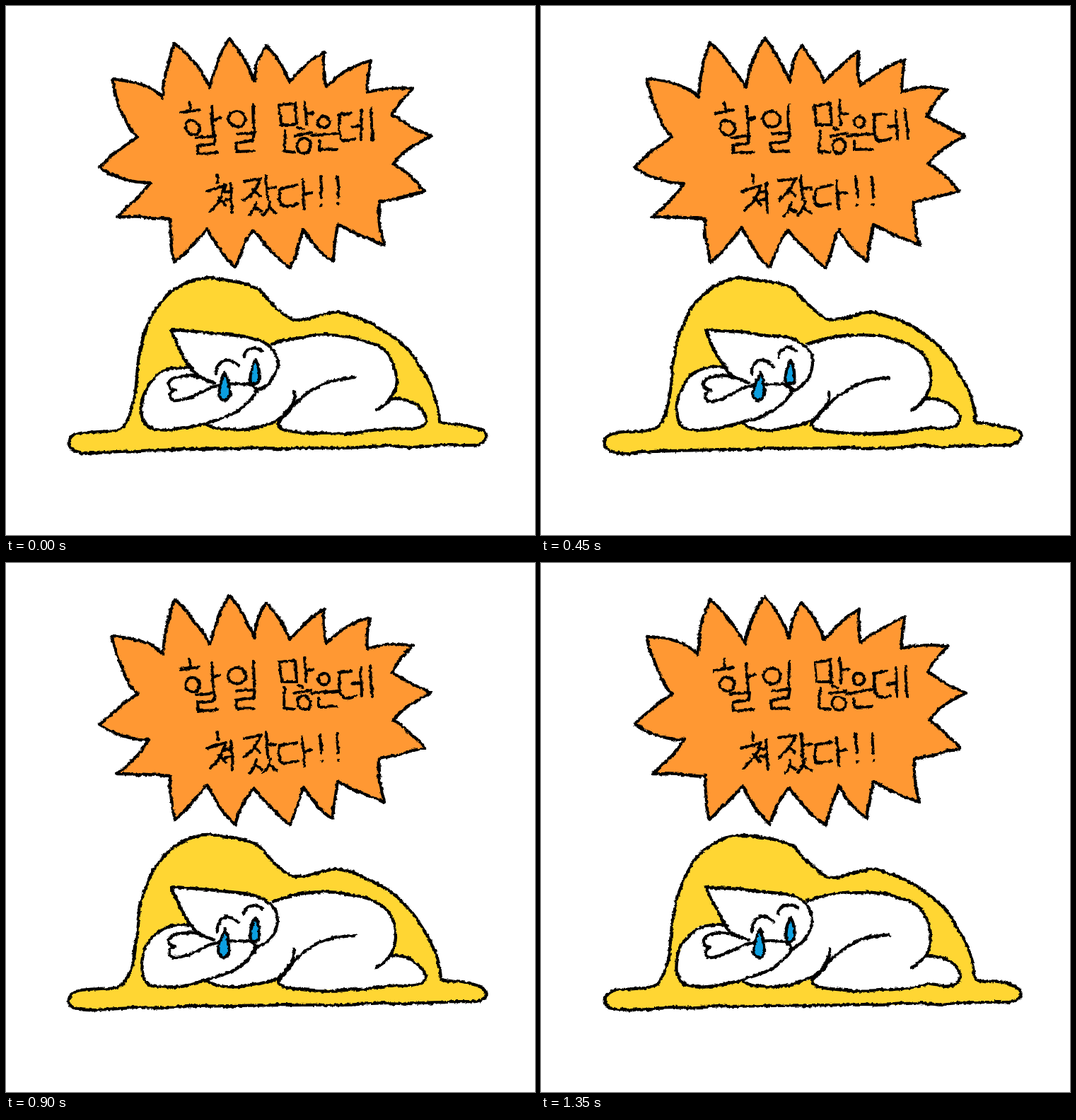
Animation of 748x748 px, one loop 1.5 s. Source, as an HTML page:

```html
<!DOCTYPE html>
<html lang="ko">
<head>
<meta charset="utf-8">
<title>할 일 많은데 쳐잤다!!</title>
<style>
  html, body { margin: 0; width: 100%; height: 100%; overflow: hidden; background: #fff; }
  svg { display: block; width: 100%; height: 100%; }
  .fills { filter: url(#drift); fill: #fff; }
  .lines { filter: url(#crayon); fill: none; stroke: #000; stroke-width: 4.3; stroke-linecap: round; stroke-linejoin: round; }
  .orange { fill: #ff9833; }
  .yellow { fill: #ffd633; }
  .tears { fill: #0c9fe0; }
  .letters { stroke-width: 4; }
</style>
</head>
<body>
<svg viewBox="0 0 748 748" role="img" aria-label="할 일 많은데 쳐잤다!!">
  <defs>
    <filter id="drift" filterUnits="userSpaceOnUse" x="0" y="0" width="748" height="748" color-interpolation-filters="sRGB">
      <feTurbulence class="noise" type="fractalNoise" baseFrequency=".03" numOctaves="2"/>
      <feDisplacementMap in="SourceGraphic" scale="3" xChannelSelector="R" yChannelSelector="G"/>
    </filter>
    <filter id="crayon" filterUnits="userSpaceOnUse" x="0" y="0" width="748" height="748" color-interpolation-filters="sRGB">
      <feTurbulence class="noise" type="fractalNoise" baseFrequency=".03" numOctaves="2" result="slow"/>
      <feDisplacementMap in="SourceGraphic" in2="slow" scale="4.5" xChannelSelector="R" yChannelSelector="G" result="bent"/>
      <feTurbulence class="noise" type="fractalNoise" baseFrequency=".22" numOctaves="2" result="grain"/>
      <feDisplacementMap in="bent" in2="grain" scale="4" xChannelSelector="G" yChannelSelector="R"/>
    </filter>

    <path id="burst" d="M149,104 Q200,106 222,129 Q224,85 239,52 Q262,70 289,115 Q296,75 316,46 Q340,74 351,106
      Q354,75 368,56 Q388,76 401,108 Q424,80 450,65 Q446,88 453,113 Q480,88 515,77 Q509,100 511,121
      Q545,112 575,117 Q556,135 546,155 Q575,172 601,184 Q565,200 548,222 Q575,240 592,262 Q560,270 528,277
      Q526,305 535,338 Q500,325 469,309 Q465,335 461,361 Q438,345 420,316 Q412,345 402,371 Q372,345 350,318
      Q332,340 324,370 Q303,350 284,314 Q264,340 239,363 Q232,335 232,301 Q190,298 157,298 Q185,275 203,250
      Q165,250 132,228 Q158,203 186,185 Q162,160 149,104Z"/>
    <path id="puddle" d="M90,621 C88,612 96,606 106,604 C128,601 150,604 166,595 C180,575 183,550 185,525
      C187,490 193,462 210,432 C228,402 255,385 285,385 C312,387 338,391 356,399 C370,412 378,428 404,443
      C428,448 445,432 470,433 C500,437 530,455 556,474 C585,503 612,545 614,588 C630,594 655,590 674,601
      C684,611 676,618 664,621 C630,622 600,619 567,624 C530,619 500,626 470,625 C400,624 330,626 260,627
      C210,629 170,628 130,632 C110,633 92,631 90,621Z"/>
    <path id="arm" d="M264,513 C228,504 207,522 197,545 C188,570 189,592 207,598 C230,603 265,596 290,587 C320,580 345,565 356,543"/>
    <path id="head" d="M294,533 C275,526 266,522 261,512 C250,495 241,478 233,458 C270,460 310,464 345,468 C370,474 384,488 384,506 C382,528 368,541 352,545"/>
  </defs>

  <g class="fills">
    <use href="#burst" class="orange"/>
    <use href="#puddle" class="yellow"/>
    <path d="M374,478 C410,466 460,458 510,474 C540,482 552,505 552,530 C550,545 546,552 543,556
      C565,552 588,565 593,583 C594,598 575,600 550,596 C510,604 450,608 400,601 C390,599 380,596 388,583
      C365,600 300,604 284,590 L300,520Z"/>
    <use href="#arm"/>
    <use href="#head"/>
  </g>

  <g class="lines">
    <use href="#burst"/>
    <use href="#puddle"/>
    <path d="M376,478 C410,466 460,458 510,474 C540,482 552,505 552,530 C550,550 540,564 524,571"/>
    <path d="M386,587 C380,595 390,599 400,601 C450,608 510,604 550,596 C575,600 594,598 593,583 C588,565 565,552 543,556"/>
    <path d="M493,526 C455,526 425,544 407,563 Q398,578 386,588 M407,546 C409,560 402,568 390,582 C365,600 300,606 284,590"/>
    <use href="#arm"/>
    <use href="#head"/>
    <path d="M294,533 C272,521 236,519 230,533 C229,540 234,543 239,543 C229,547 229,558 240,558 C258,558 268,546 290,539 C315,533 345,531 354,542"/>
    <path d="M298,521 C296,502 314,493 329,509 M336,496 C338,483 352,480 362,488"/>
    <g class="tears">
      <path d="M310,518 C304,530 300,540 300,550 C302,560 314,560 316,550 C317,538 314,528 310,518Z"/>
      <path d="M353,501 C347,512 344,525 346,532 C349,537 356,536 358,530 C359,518 357,508 353,501Z"/>
    </g>
    <g class="letters">
      <path d="M259,136 L261,146 M246,152 L273,148 M263,162 a10,10 0 1 0 1,0 M291,142 L293,180 M292,162 L303,158 M268,186 L295,183 L294,194 L271,197 L272,208 L299,207"/>
      <path d="M326,149 a12,11 0 1 0 1,0 M350,140 L351,174 M327,181 L352,178 L350,190 L325,194 L326,206 L351,205"/>
      <path d="M387,140 L389,168 M388,140 L409,138 L411,168 L389,168 M422,134 L424,168 M423,152 L434,151 M394,177 L393,205 L409,207 M413,173 L420,175 M408,184 L432,180 M421,188 a9,10 0 1 0 1,0"/>
      <path d="M449,156 a8,8 0 1 0 1,0 M433,184 L469,180 M443,191 L443,204 L468,203"/>
      <path d="M470,155 L488,153 M472,155 Q469,180 475,188 Q482,193 494,187 M490,171 L502,169 M502,148 L503,188 M516,146 L518,189"/>
      <path d="M299,239 L300,250 M284,262 L311,254 Q304,276 288,290 M301,271 L310,281 M309,263 L319,262 M309,274 L319,273 M318,251 L320,292"/>
      <path d="M336,248 L361,244 Q352,264 336,274 M350,259 L359,268 M368,240 L370,274 M370,258 L382,257 M353,278 Q351,290 344,297 M352,286 L361,291 M373,277 Q370,290 363,296 M371,285 L382,293"/>
      <path d="M411,253 L388,258 Q385,274 389,282 Q400,285 411,280 M419,247 L421,287 M421,266 L432,264"/>
      <path d="M445,242 L447,270 M447,281 h.5 M468,242 L470,270 M470,280 h.5"/>
    </g>
  </g>
</svg>
<script>
  const STEP = 150, POSES = 10;
  const noises = document.querySelectorAll('.noise');
  let shown = -1;

  // Each pose redraws the same lines with a fresh hand tremble.
  function draw() {
    const pose = Math.floor(performance.now() / STEP) % POSES;
    if (pose !== shown) {
      shown = pose;
      noises.forEach((noise, i) => noise.setAttribute('seed', 3 + pose * 7 + i * 101));
    }
    requestAnimationFrame(draw);
  }
  draw();
</script>
</body>
</html>
```
